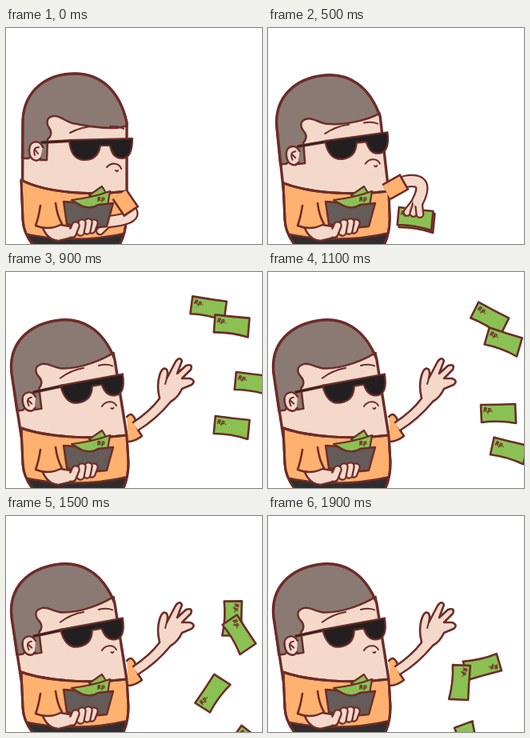
Write an HTML page with a canvas that moves like this. It is 320x270 px and loops after 2 s.

```html
<!DOCTYPE html>
<html lang="en">
<head>
<meta charset="utf-8">
<title>Throwing money</title>
<style>
html, body { margin: 0; width: 100%; height: 100%; overflow: hidden; background: #fff; }
canvas { display: block; }
</style>
</head>
<body>
<canvas id="stage" width="320" height="270"></canvas>
<script>
const ctx = document.getElementById('stage').getContext('2d');
const LINE = '#6c2d29', SKIN = '#f4d9cb', HAIR = '#8b7a73', SHIRT = '#ffb16f',
      GREEN = '#8bc152', BLACK = '#231f20', PANTS = '#312d2e', WALLET = '#655b58';

const STEP = 100, STEPS = 20, THROW = 7;
const lerp = (a, b, u) => a + (b - a) * u;

function shape(d, fill, width = 3, stroke = LINE) {
  const path = new Path2D(d);
  if (fill) { ctx.fillStyle = fill; ctx.fill(path); }
  if (width) { ctx.lineWidth = width; ctx.strokeStyle = stroke; ctx.stroke(path); }
}

function at(x, y, degrees, draw) {
  ctx.save();
  ctx.translate(x, y);
  ctx.rotate(degrees * Math.PI / 180);
  draw();
  ctx.restore();
}

function limb(d, width, color, cap = 'round') {
  ctx.lineCap = cap;
  shape(d, null, width, color);
  ctx.lineCap = 'round';
}

function outlinedLimb(d, width, color) {
  limb(d, width + 4.5, LINE);
  limb(d, width, color);
}

function label(x, y, text = 'Rp.') {
  ctx.fillStyle = LINE;
  ctx.font = 'italic 800 8px "Open Sans", sans-serif';
  ctx.fillText(text, x, y);
}

function bill(x, y, angle) {
  at(x, y, angle, () => {
    shape('M-22 -11 Q0 -11 21 -12 L22 12 Q0 8 -21 11 Z', GREEN, 2.6);
    label(-19, -2);
  });
}

function head(lean) {
  const top = 57 + 2 * lean, hairEnd = 122 - 12 * lean;
  at(85, 210, -9 * lean, () => {
    ctx.translate(-85, -210);
    const skull = `L21 115 C23 77 52 ${top} 86 ${top} C118 ${top} 142 78 151 118 `;
    const face = `M20.5 215 ${skull} L151 215`;
    shape(face, SKIN, 0);
    shape(`M20 163 ${skull} L151 ${hairEnd} C137 ${hairEnd + 6} 108 124 83 119 ` +
          'C73 116 67 109 60 110 C50 111 50 119 54 125 C58 131 56 136 52 139 ' +
          'L51 165 L43 165 L43 150 L28 163 Z', HAIR, 2.5);
    shape(face, null, 3.4);
    shape('M46 149 C42 139 29 140 29 153 C29 166 39 168 43 163', SKIN, 2.5);
    shape('M41 149 Q33 149 36 159 M37 153 L40 157', null, 2);
    shape('M80 131 Q95 123 111 123 M130 123 Q140 122 147 126', null, 2);
    shape('M45 143 L82 141', null, 4);
    shape('M45 143 L82 141', null, 1.5, BLACK);
    shape('M79 140 L158 138 C158 155 153 163 145 163 C135 163 132 156 130 147 L118 147 ' +
          'C116 159 110 165 98 165 C86 165 80 155 79 140 Z', BLACK, 2.2);
    shape('M126 174 C132 167 142 169 144 176 M137 178 Q139 180 140 178', null, 2);
  });
}

function body(lean) {
  const right = 150 + 3 * lean;
  const outline = `M19 ${190 + 5 * lean} C50 206 105 210 151 204 ` +
    `L${right} 238 Q${right} 259 ${140 + 5 * lean} 274 L36 274 Q22 258 21 240 Z`;
  shape(outline, SHIRT);
  ctx.save();
  ctx.clip(new Path2D(outline));
  shape('M18 256 Q85 272 156 255 L156 278 L18 278 Z', PANTS, 2.5);
  ctx.restore();
  shape(outline, null);
}

// Shoulder, cuff, elbow and hand positions, finger angle, then the held bill.
const reach = [
  [0, 142, 208, 157, 230, 160, 239, 128, 242, 60, 104, 236, -10],
  [2, 142, 214, 168, 207, 172, 215, 144, 241, 55, 138, 246, -15],
  [5, 148, 205, 171, 192, 203, 186, 187, 217, 8, 184, 238, 8],
  [6, 148, 203, 171, 190, 210, 182, 203, 209, 0, 200, 230, 5]
];

function reachingArm(frame) {
  const i = Math.max(1, reach.findIndex(key => key[0] >= frame));
  const from = reach[i - 1], to = reach[i];
  const u = (frame - from[0]) / (to[0] - from[0]);
  const [, sx, sy, cx, cy, ex, ey, hx, hy, turn, bx, by, tilt] =
    from.map((value, k) => lerp(value, to[k], u));

  if (frame) {
    bill(bx + 2, by + 3, tilt);
    bill(bx, by, tilt);
  }
  const forearm = `M${cx} ${cy} Q${ex} ${ey} ${hx} ${hy}`;
  limb(forearm, 16.5, LINE);
  at(hx, hy, turn, () => {
    for (const x of [-11, -3, 5]) outlinedLimb(`M${x / 3} 2 L${x} 15`, 6.5, SKIN);
  });
  limb(forearm, 12, SKIN);
  limb(`M${sx} ${sy} L${cx} ${cy}`, 23, LINE, 'butt');
  limb(`M${sx} ${sy} L${lerp(sx, cx, .9)} ${lerp(sy, cy, .9)}`, 18, SHIRT, 'butt');
}

function raisedArm() {
  shape('M151 181 Q156 174 161 183 Q163 196 170 205 Q161 212 153 212', SHIRT, 2.6);
  shape('M159 188 Q180 174 192 158 Q188 142 192 129 Q196 117 201 122 Q203 126 201 133 ' +
        'L212 112 Q217 105 220 111 L214 127 L225 117 Q234 114 231 122 L220 133 L230 133 ' +
        'Q238 136 232 141 L220 146 Q215 157 206 162 Q188 184 165 198', SKIN, 2.6);
  shape('M201 133 L199 140', null, 2);
}

function walletArm() {
  shape('M104 209 L120 198 L125 206 L120 220 Z', GREEN, 2.2);
  shape('M82 215 Q108 212 130 204 L127 222 L106 229 Z', GREEN, 2.2);
  at(114, 217, -8, () => label(0, 0, 'Rp'));
  shape('M72 217 L86 218 Q104 229 115 221 L134 219 L126 248 Q100 252 76 245 Z', WALLET, 2.4);

  shape('M46 250 Q52 265 66 266 L86 261 L80 248 L68 246', SKIN, 2.5);
  shape('M43 221 Q41 236 37 247 Q54 254 70 245 Q64 235 62 219', SHIRT, 0);
  shape('M43 222 Q41 236 37 247 Q54 254 70 245 Q64 235 62 219', null, 2.5);
  for (const finger of ['M110 244 L107 252', 'M103 243 L101 253', 'M95 244 L93 255', 'M87 247 L83 257'])
    outlinedLimb(finger, 7, SKIN);
  limb('M71 257 L82 256', 9, SKIN);
}

// Each path holds x, y and angle at the four moments below.
const moments = [9, 11, 15, 19];
const flights = [
  { x: [253, 277, 283, 268], y: [45, 58, 128, 188], angle: [10, 29, 92, 166] },
  { x: [282, 294, 291, 240], y: [67, 87, 148, 208], angle: [7, 19, 58, 95] },
  { x: [308, 288, 258, 251], y: [139, 177, 222, 281], angle: [8, 0, -55, -108] },
  { x: [282, 301, 305, 300], y: [194, 223, 284, 350], angle: [8, 15, 38, 70] }
];

// Smooth cubic through four values.
function through(values, time) {
  return values.reduce((sum, value, i) => sum + moments.reduce(
    (part, m, k) => k === i ? part : part * (time - m) / (moments[i] - m), value), 0);
}

function draw(frame) {
  ctx.fillStyle = '#fff';
  ctx.fillRect(0, 0, 320, 270);
  ctx.lineJoin = ctx.lineCap = 'round';
  const lean = Math.min(frame / THROW, 1);
  head(lean);
  body(lean);
  if (frame < THROW) reachingArm(frame);
  else raisedArm();
  walletArm();
  if (frame > THROW)
    for (const f of flights)
      bill(through(f.x, frame), through(f.y, frame), through(f.angle, frame));
}

const start = performance.now();
function tick() {
  draw(Math.floor((performance.now() - start) / STEP) % STEPS);
  requestAnimationFrame(tick);
}
tick();
</script>
</body>
</html>
```
